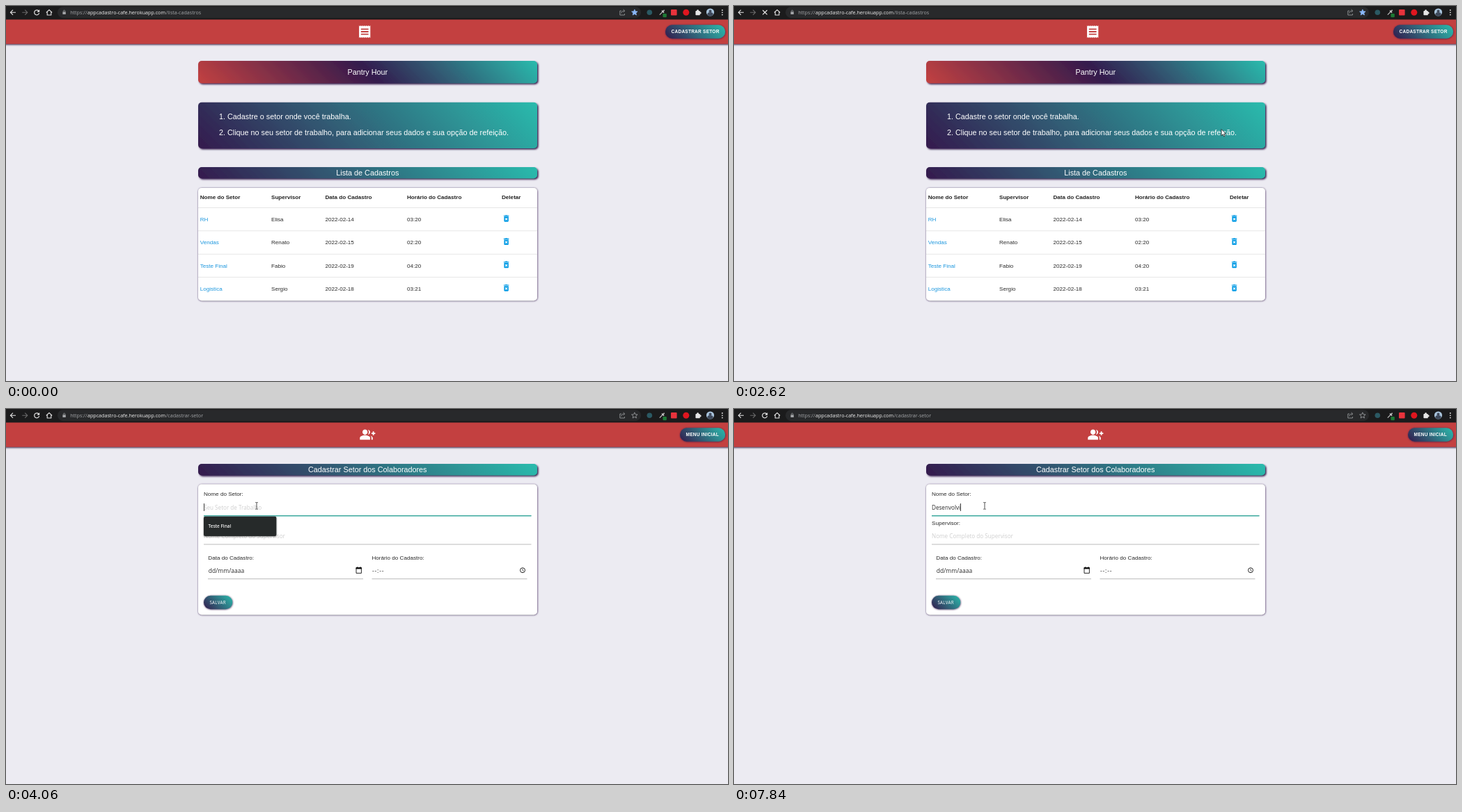
An HTML page for the animation above (8000 ms loop, 1037 by 540 pixels).

```html
<!DOCTYPE html>
<html lang="pt-BR">
<head>
<meta charset="utf-8">
<title>Cadastro</title>
<style>
html, body { margin: 0; width: 100%; height: 100%; overflow: hidden; background: #ecebf2; }
svg { display: block; width: 1037px; height: 540px; }
text { white-space: pre; }
.a { font-family: "Liberation Sans", Arial, sans-serif; }
.o { font-family: "Open Sans", "Noto Sans", sans-serif; }
.b { font-weight: bold; }
.ln { fill: none; stroke-linecap: butt; }
</style>
</head>
<body>
<svg id="stage" viewBox="0 0 1037 540" xmlns="http://www.w3.org/2000/svg"></svg>
<script>
const LOOP = 8000, SWITCH = 2690, FOCUS = 3800;
const PLUM = '#341a4d', TEAL = '#2bbbad', RED = '#c34141', BLUE = '#1d97de';
let defs = '', gradCount = 0;

const shadow = (id, dx, dy, blur, color) =>
  `<filter id="${id}" filterUnits="userSpaceOnUse" x="-10" y="-10" width="1057" height="560">
   <feDropShadow dx="${dx}" dy="${dy}" stdDeviation="${blur}" flood-color="${color}"/></filter>`;
defs += shadow('deep', 1.6, 1.6, 1.1, PLUM) + shadow('soft', .3, .4, 1.3, PLUM) +
  shadow('bar', 0, 1.2, 1.3, '#33254a') + shadow('menu', 0, .8, .9, '#0008');

// Rounded box with a 45 degree gradient running from corner to corner.
function box(x, y, w, h, r, colors, filter = 'deep') {
  const id = 'g' + gradCount++, d = (w + h) / 4, cx = x + w / 2, cy = y + h / 2;
  const stops = colors.map((c, i) => `<stop offset="${i / (colors.length - 1)}" stop-color="${c}"/>`).join('');
  defs += `<linearGradient id="${id}" gradientUnits="userSpaceOnUse" x1="${cx - d}" y1="${cy + d}" x2="${cx + d}" y2="${cy - d}">${stops}</linearGradient>`;
  return rect(x, y, w, h, `url(#${id})`, r, `filter="url(#${filter})"`);
}
const rect = (x, y, w, h, fill, r = 0, more = '') =>
  `<rect x="${x}" y="${y}" width="${w}" height="${h}" rx="${r}" fill="${fill}" ${more}/>`;
const circle = (x, y, r, fill) => `<circle cx="${x}" cy="${y}" r="${r}" fill="${fill}"/>`;
const text = (x, y, size, str, fill = '#fff', cls = 'a', more = '') =>
  `<text x="${x}" y="${y}" font-size="${size}" fill="${fill}" class="${cls}" ${more}>${str}</text>`;
const middle = (y, str) => text(519.3, y, 10.8, str, '#fff', 'a', 'text-anchor="middle"');
const line = (d, color, w = 1.1) => `<path class="ln" d="${d}" stroke="${color}" stroke-width="${w}"/>`;
const icon = (x, y, s, d, fill = '#fff') =>
  `<path transform="translate(${x} ${y}) scale(${s})" d="${d}" fill="${fill}"/>`;
const pill = (x, w, label) => box(x, 27.3, w, 19.4, 9.7, [PLUM, TEAL], 'soft') +
  text(x + 8.6, 39.2, 6.48, label, '#fff', 'a b', 'letter-spacing=".27"');
const group = (id, body) => `<g id="${id}">${body}</g>`;

function star(cx, cy, r) {
  let d = '';
  for (let i = 0; i < 10; i++) {
    const a = i * Math.PI / 5, q = i % 2 ? r * .45 : r;
    d += (i ? 'L' : 'M') + (cx + q * Math.sin(a)).toFixed(2) + ' ' + (cy - q * Math.cos(a)).toFixed(2);
  }
  return d + 'Z';
}

const RECEIPT = 'M18 17H6v-2h12v2zm0-4H6v-2h12v2zm0-4H6V7h12v2zM3 22' + 'l1.5-1.5l1.5 1.5'.repeat(6) +
  'V2' + 'l-1.5 1.5l-1.5-1.5'.repeat(6) + 'z';
const PEOPLE = 'M22 9V7h-2v2h-2v2h2v2h2v-2h2V9zM8 12c2.21 0 4-1.79 4-4s-1.79-4-4-4-4 1.79-4 4 1.79 4 4 4zm0 1c-2.67 0-8 1.34-8 4v3h16v-3c0-2.66-5.33-4-8-4zm4.51-8.95C13.43 5.11 14 6.49 14 8s-.57 2.89-1.49 3.95C14.47 11.7 16 10.04 16 8s-1.53-3.7-3.49-3.95zm4.02 9.78C17.42 14.66 18 15.7 18 17v3h2v-3c0-1.45-1.59-2.51-3.47-3.17z';
const BIN = 'M6 19c0 1.1.9 2 2 2h8c1.1 0 2-.9 2-2V7H6v12zm2.46-7.12l1.41-1.41L12 12.59l2.12-2.12 1.41 1.41L13.41 14l2.12 2.12-1.41 1.41L12 15.41l-2.12 2.12-1.41-1.41L10.59 14zM15.5 4l-1-1h-5l-1 1H5v2h14V4z';

function listPage() {
  const cols = [278.7, 381, 458.4, 576, 712];
  const heads = ['Nome do Setor', 'Supervisor', 'Data do Cadastro', 'Horário do Cadastro', 'Deletar'];
  const rows = [
    ['RH', 'Elisa', '2022-02-14', '03:20'],
    ['Vendas', 'Renato', '2022-02-15', '02:20'],
    ['Teste Final', 'Fabio', '2022-02-19', '04:20'],
    ['Logistica', 'Sergio', '2022-02-18', '03:21']
  ];
  let s = box(276, 79, 487, 32.2, 5, [RED, PLUM, TEAL]) + middle(98.7, 'Pantry Hour');
  s += box(276, 138.7, 487, 66.3, 5, [PLUM, TEAL]);
  s += text(306, 162.8, 10.8, '1.') + text(318, 162.8, 10.8, 'Cadastre o setor onde você trabalha.');
  s += text(306, 185.8, 10.8, '2.') +
    text(318, 185.8, 10.8, 'Clique no seu setor de trabalho, para adicionar seus dados e sua opção de refeição.');
  s += box(276, 232, 487, 16.3, 5, [PLUM, TEAL]) + middle(243.8, 'Lista de Cadastros');
  s += rect(276, 262, 487, 162.3, '#fff', 5, 'filter="url(#soft)"');
  heads.forEach((h, i) => s += text(cols[i], 278.4, 8.12, h, '#212121', 'a b'));
  rows.forEach((row, r) => {
    const y = 310 + r * 33.35;
    s += rect(276, 290.2 + r * 33.35, 487, .6, '#d6d6d6');
    row.forEach((v, i) => s += text(cols[i], y, 8.12, v, i ? '#2b2b2b' : BLUE));
    s += icon(712.1, y - 10.7, .54, BIN, '#039be5');
  });
  return s + icon(504.4, 26.2, .9, RECEIPT) + pill(947, 86, 'CADASTRAR SETOR');
}

function formPage() {
  const label = (x, y, s) => text(x, y, 8.12, s, '#2b2b2b');
  const rule = (x, y, w) => rect(x, y, w, .7, '#9e9e9e');
  const hint = (id, y, s) => text(284, y, 8.15, s, '#cfcfcf', 'o', `id="${id}"`);
  let s = box(276, 79, 487, 16.5, 5, [PLUM, TEAL]) + middle(90.7, 'Cadastrar Setor dos Colaboradores');
  s += rect(276, 108.6, 487, 187.6, '#fff', 5, 'filter="url(#soft)"');
  s += label(284, 125.4, 'Nome do Setor:') + hint('hint', 145, 'Seu Setor de Trabalho') + rule(284, 153.3, 470.5);
  s += label(284, 167.2, 'Supervisor:') + hint('hint2', 186.2, 'Nome Completo do Supervisor') + rule(284, 194.6, 470.5);
  s += label(290.3, 216.6, 'Data do Cadastro:') + rule(290, 244.4, 223);
  s += label(525.5, 216.6, 'Horário do Cadastro:') + rule(525.5, 244.4, 223);
  s += text(290.8, 235.5, 8.5, 'dd/mm/aaaa', '#2b2b2b', 'o');
  s += text(526, 235.5, 8.5, '--:--', '#2b2b2b', 'o', 'letter-spacing=".8"');
  s += line('M503 229H510.4V236.4H503Z', '#111', .9) + rect(502.6, 228, 8.3, 2.4, '#111') +
    line('M504.4 227v2M509 227v2', '#111', .9);
  s += '<circle cx="742" cy="232.2" r="3.5" class="ln" stroke="#111" stroke-width=".9"/>' +
    line('M742 230v2.4l1.7 1', '#111', .7);
  s += box(284, 268.8, 41.3, 19.4, 9.7, [PLUM, TEAL], 'soft') +
    text(292.4, 280.8, 6.25, 'SALVAR', '#fff', 'o', 'letter-spacing=".27"');
  s += rect(284, 153.2, 470.5, 1.3, '#26a69a', 0, 'id="active"');
  s += text(284, 145, 8.15, '', '#2b2b2b', 'o', 'id="typed"') + rect(0, 136, .8, 11, '#111', 0, 'id="caret"');
  s += group('drop', rect(284, 154.7, 104.3, 28.3, '#27292c', 2, 'filter="url(#menu)"') +
    text(290.5, 171.4, 6.45, 'Teste Final', '#f1f1f1', 'o', 'font-weight="600"'));
  return s + icon(508.3, 25.9, .92, PEOPLE) + pill(968, 65, 'MENU INICIAL');
}

function browserBar() {
  const W = '#e6e6e6', G = '#a3a5a8';
  let s = rect(0, 0, 1037, 19.5, '#1b1b1c') + rect(74, 1.2, 838, 16, '#28292b', 8);
  s += line('M14 9.2H6.6M10 5.6L6.4 9.2L10 12.8', W);
  s += line('M23.2 9.2H30.6M27.2 5.6L30.8 9.2L27.2 12.8', '#6a6a6a');
  s += group('reload', line('M46.9 7.1A3.5 3.5 0 1 0 47.6 10.2', W, 1.2) + `<path d="M48.2 5V8.8H44.4Z" fill="${W}"/>`);
  s += group('stop', line('M41.2 6L47.6 12.4M47.6 6L41.2 12.4', W, 1.2));
  s += line('M57.8 9.4L62 5.6L66.2 9.4M59.2 8.6V13H64.8V8.6', W);
  s += rect(81.4, 8.3, 4.4, 3.8, G, .5) + line('M82.4 8.4V7.3a1.2 1.2 0 0 1 2.4 0V8.4', G, .7);
  s += text(92.2, 12, 7.15, 'https://', G, 'o') + text(117, 12, 7.15, 'appcadastro-cafe.herokuapp.com', '#f0f0f0', 'o');
  s += text(229.7, 12, 7.15, '', G, 'o', 'id="path"');
  s += line('M884 7H881.8V13H888.4V11', G, .8) + line('M883.8 10.4C884 8 885.5 7 888 7M886.6 5L888.8 7L886.6 9', G, .8);
  s += `<path id="star" d="${star(902.8, 9.4, 4.5)}" stroke-width=".8"/>`;
  s += circle(924.3, 9.3, 3.8, '#2b5963');
  s += line('M938.8 12.6L943 8.4', '#c8c8c8', 1.2) + line('M942 6.6L945 9.6M943.4 8L945.6 5.8', '#c8c8c8', 1.5);
  s += rect(943.4, 11, 5.4, 5.2, '#1d7a35', 1);
  s += rect(955, 5, 8.6, 8.6, '#e8333c', 1) + circle(976.8, 9.3, 4.5, '#e0161f');
  s += rect(990.4, 7, 6.4, 6.2, W, .8) + circle(993.6, 6.6, 1.4, W) + circle(997.2, 10, 1.4, W);
  s += circle(1011.5, 9, 5.6, '#a9c4dc') + circle(1011.5, 7.4, 2, '#3f4a5c') +
    '<path d="M1007.2 12.5a4.3 3.4 0 0 1 8.6 0a5.6 5.6 0 0 1-8.6 0Z" fill="#3f4a5c"/>';
  return s + [6, 9.3, 12.6].map(y => circle(1028.8, y, .9, W)).join('');
}

function pointers() {
  const arrow = '<path d="M0 0V9.2L2.2 7.2L3.6 10.4L5.1 9.7L3.7 6.6H6.6Z" fill="#fff" stroke="#111" stroke-width=".75"/>';
  const hand = '<path d="M-.9 .6Q0-.6 .9 .6V4.2L4.6 5Q5.8 5.4 5.6 6.8L4.8 10.6H.4L-2.4 7.2Q-2.6 5.8-.9 6.6Z" fill="#fff" stroke="#222" stroke-width=".7"/>';
  const beam = line('M-1.8-4.9H-.6L0-4.4L.6-4.9H1.8M0-4.4V4.2M-1.8 4.7H-.6L0 4.2L.6 4.7H1.8', '#222', .8);
  return group('pointer', '<circle id="click" r="6.6" fill="#e6cf1c" fill-opacity=".78"/>' +
    group('arrow', arrow) + group('hand', hand) + group('beam', beam));
}

const body = group('list', '') + group('form', '');
const header = rect(-10, 19, 1057, 35.6, RED, 0, 'filter="url(#bar)"');
const pages = [listPage(), formPage()];
const stage = document.getElementById('stage');
stage.innerHTML = `<defs>${defs}</defs>` + rect(0, 0, 1037, 540, '#ecebf2') + header +
  group('list', pages[0]) + group('form', pages[1]) + browserBar() + pointers();

const el = {};
stage.querySelectorAll('[id]').forEach(n => el[n.id] = n);
const show = (n, on) => n.setAttribute('visibility', on ? 'visible' : 'hidden');
const clamp = v => Math.max(0, Math.min(1, v));

// Pointer path: time, x, y
const path = [
  [320, 931, 523], [389, 931, 523], [390, 805, 471], [710, 805, 471], [1000, 768, 345],
  [1280, 845, 170], [1540, 946, 50], [1700, 967, 36], [2060, 967, 36], [2300, 880, 85],
  [2550, 700, 177.5], [2800, 700, 177.5], [3230, 530, 210], [3500, 412, 168],
  [3720, 360, 139.5], [8000, 360, 139.5]
];
const same = (p, q) => p[1] === q[1] && p[2] === q[2];

function slope(i, k) {
  const p = path[i - 1], c = path[i], n = path[i + 1];
  return !p || !n || same(p, c) || same(c, n) ? 0 : (n[k] - p[k]) / (n[0] - p[0]);
}
function pointerAt(t) {
  let i = 0;
  while (i < path.length - 2 && t >= path[i + 1][0]) i++;
  const a = path[i], b = path[i + 1], d = b[0] - a[0], u = clamp((t - a[0]) / d), v = 1 - u;
  return [1, 2].map(k => a[k] * v * v * (1 + 2 * u) + b[k] * u * u * (3 - 2 * u) +
    d * u * v * (v * slope(i, k) - u * slope(i + 1, k)));
}

const WORD = 'Desenvolvi';
const keys = [5190, 5470, 5670, 5870, 6070, 6460, 6590, 7050, 7710, 7840];

function draw(t) {
  const form = t >= SWITCH;
  show(el.list, !form);
  show(el.form, form);
  el.path.textContent = form ? '/cadastrar-setor' : '/lista-cadastros';
  el.star.setAttribute('fill', form ? 'none' : '#8ab8f8');
  el.star.setAttribute('stroke', form ? '#a3a5a8' : '#8ab8f8');
  const loading = t >= 1960 && !form;
  show(el.stop, loading);
  show(el.reload, !loading);

  const [x, y] = pointerAt(t);
  const seen = t >= 320;
  const onButton = !form && x > 947 && y < 47;
  const onField = form && x > 284 && x < 754 && ((y > 132 && y < 154) || (y > 172 && y < 195));
  el.pointer.setAttribute('transform', `translate(${x} ${y})`);
  show(el.hand, seen && onButton);
  show(el.beam, seen && onField);
  show(el.arrow, seen && !onButton && !onField);
  show(el.click, (t >= 1820 && t < 1960) || (t >= 3790 && t < 4060));

  const count = keys.filter(k => t >= k).length;
  const last = count ? keys[count - 1] : FOCUS;
  el.typed.textContent = WORD.slice(0, count);
  show(el.hint, form && !count);
  el.caret.setAttribute('x', 284 + (count ? el.typed.getComputedTextLength() : 0));
  show(el.caret, t >= FOCUS && (t - last) % 1120 < 530);
  el.active.setAttribute('opacity', clamp((t - FOCUS) / 200));
  el.drop.setAttribute('opacity', t < 3930 ? 0 : 1 - clamp((t - 5190) / 210));
}

function tick(now) {
  draw(now % LOOP);
  requestAnimationFrame(tick);
}
draw(0);
requestAnimationFrame(tick);
</script>
</body>
</html>
```
